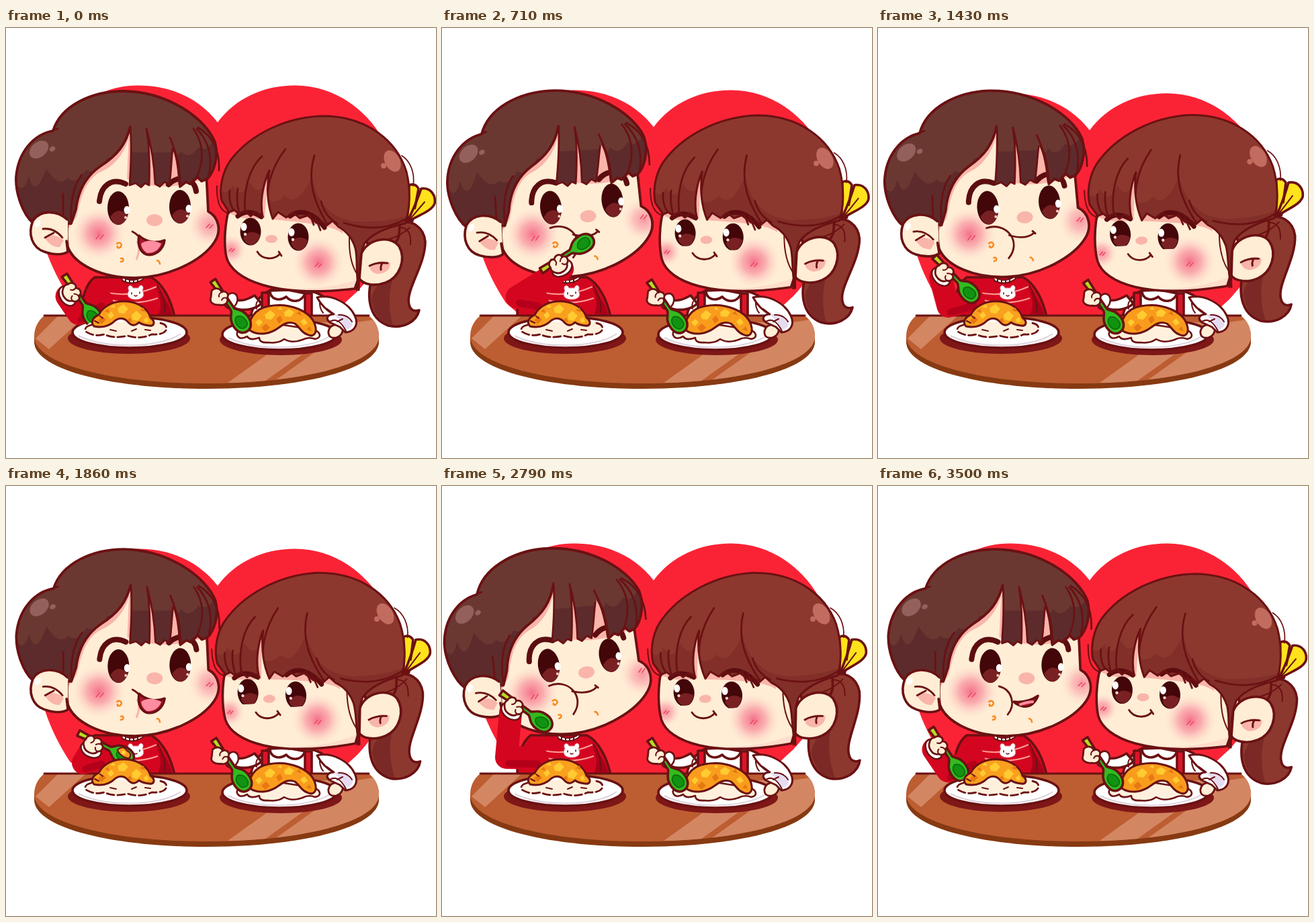
An HTML page that plays this animation: 640 by 640 pixels, repeating every 3.57 s.

```html
<!DOCTYPE html>
<html lang="en">
<head>
<meta charset="utf-8">
<title>Lunch together</title>
<style>
html, body { margin: 0; width: 100%; height: 100%; overflow: hidden; background: #fff; }
svg { display: block; width: 100%; height: 100%; }
.o { stroke: #6b1113; stroke-width: 3.6; stroke-linejoin: round; stroke-linecap: round; }
.l { fill: none; stroke: #6b1113; stroke-width: 2.8; stroke-linecap: round; stroke-linejoin: round; }
.t { stroke-width: 2; }
.b { stroke-width: 8; stroke: #5c0d10; }
.skin { fill: #ffedd6; }
.pink { fill: #f9b5aa; }
.white { fill: #fff; }
.crumb { fill: none; stroke: #f98b1d; stroke-width: 2.6; stroke-linecap: round; }
.tick { fill: none; stroke: #ee4863; stroke-width: 1.6; stroke-linecap: round; }
</style>
</head>
<body>
<svg viewBox="0 0 640 640">
<defs>
  <radialGradient id="blush">
    <stop offset="0" stop-color="#f4718a"/>
    <stop offset=".45" stop-color="#f8939e" stop-opacity=".7"/>
    <stop offset="1" stop-color="#ffd6c8" stop-opacity="0"/>
  </radialGradient>
  <linearGradient id="strand" gradientUnits="userSpaceOnUse" x1="0" y1="180" x2="0" y2="190">
    <stop offset=".4" stop-color="#6b3831"/>
    <stop offset=".6" stop-color="#5d2b2b"/>
  </linearGradient>
  <path id="boyFace" d="M99 225C94 265 88 300 92 326C102 352 142 372 192 372C243 371 292 346 310 319C322 301 316 281 301 273L296 175L185 130Z"/>
  <path id="boyHair" d="M40 290C25 277 14 246 15 222C18 184 42 158 70 153C82 115 128 94 175 94C240 95 296 133 311 170C317 192 309 216 299 225L291 228L285 222L274 232L268 229L259 236C258 212 256 192 247 174C238 158 205 149 185 147C178 174 166 189 140 206C117 222 107 245 104 270L97 291Z"/>
  <path id="girlFace" d="M334 262C325 290 324 322 328 341C337 375 400 402 519 388L540 330L520 240L360 200Z"/>
  <path id="girlHair" d="M321 257C317 239 322 214 334 197C364 157 420 131 476 131C538 133 582 168 596 214C603 242 601 272 594 291C570 296 546 305 534 320C527 334 526 352 525 390C520 362 524 345 520 328C515 311 506 302 495 296L486 287L477 294L468 287L462 290L449 279L437 283L428 275L417 282L405 274L397 284C389 262 387 240 392 212C381 235 378 262 382 281L372 274L364 280L356 272L347 277L340 271L332 274Z"/>
  <path id="tableTop" d="M57 428H540C550 436 555 447 555 459C555 500 440 529 298 529C155 529 42 500 42 459C42 447 47 436 57 428Z"/>
  <clipPath id="cBoyFace"><use href="#boyFace"/></clipPath>
  <clipPath id="cBoyHair"><use href="#boyHair"/></clipPath>
  <clipPath id="cGirlFace"><use href="#girlFace"/></clipPath>
  <clipPath id="cGirlHair"><use href="#girlHair"/></clipPath>
  <clipPath id="cTable"><use href="#tableTop"/></clipPath>
  <clipPath id="cEye"><rect id="lid" x="346" y="276" width="36" height="48"/></clipPath>
  <g id="spoon">
    <path class="o" fill="#b9dc22" d="M-28 -4L-2 -3V3L-28 5Z"/>
    <path class="o" fill="#33bb1f" d="M-2 -3L24 -3C29 -5 32 -13 46 -13C57 -13 63 -7 63 0C63 8 57 13 46 13C32 13 29 4 24 3L-2 3Z"/>
    <path fill="#119311" stroke="#0a6a0c" stroke-width="1.6" d="M36 1C38 -7 47 -8 52 -7C59 -4 58 5 51 7C44 9 38 7 36 1Z"/>
  </g>
</defs>

<path id="heart" fill="#fa2335" d="M315 140.5C288 105 246 85.5 197 85.5C115 85 47 158 45 240C45 301 62 351 95 402L150 450H460L523 392C562 351 582 301 582 240C580 158 512 85 430 85.5C383 85.5 341 105 315 140.5Z"/>

<!-- girl: tail and body -->
<g class="girlHead">
  <path fill="#8d382e" d="M520 285L602 285L604 325L582 338L556 320L530 340Z"/>
  <g id="tail">
    <path class="o" fill="#8d382e" d="M586 292C602 283 622 296 624 318C624 354 594 390 600 412C602 421 609 422 615 420C611 438 590 448 569 443C538 432 535 396 548 361C557 338 580 327 585 309Z"/>
    <path fill="#7b2926" d="M590 342C577 364 550 376 544 402C547 430 561 441 576 442C569 420 566 376 590 342Z"/>
    <path class="l t" d="M588 297Q604 299 602 322"/>
  </g>
</g>
<g>
  <path class="o white" d="M364 430C368 411 376 398 396 389L455 392C474 397 487 409 490 430Z"/>
  <path class="o white" d="M334 403C349 408 358 405 370 398L380 410C370 420 351 422 339 416Z"/>
  <path class="o" fill="#dd1429" d="M381 394H391V430H381ZM445 395H455V430H445Z"/>
  <path class="o white" d="M393 391C393 403 406 408 417 400C425 409 440 409 445 395L420 390Z"/>
  <path class="l t" d="M374 407Q371 412 373 418M467 405Q466 417 472 424"/>
</g>

<!-- boy: body and head -->
<g>
  <path class="o" fill="#d4061f" d="M112 430C112 407 117 382 132 371H216C235 381 246 407 251 430Z"/>
  <path fill="#a90019" d="M222 386C235 397 245 414 248 430H225C233 415 231 399 222 386Z"/>
  <path d="M151 394Q188 401 224 385M150 403Q190 415 226 402" fill="none" stroke="#ff9c96" stroke-width="2"/>
  <path class="o white" style="stroke-width:2" d="M172 370Q188 381 205 369L204 374Q188 384 173 376Z"/>
  <path class="l t" d="M178 373V378M184 375V380M190 375V380M196 374V379M225 384Q238 402 236 423"/>
  <path class="white" stroke="#e8889a" d="M183 391C179 383 187 381 189 387H197C199 380 207 383 203 391C208 400 201 404 193 404C184 404 178 399 183 391Z"/>
  <path d="M187 394V396M199 393V395M191 398Q193 400 195 398" class="l" style="stroke-width:1.6"/>
</g>
<g id="boyHead">
  <use href="#boyFace" class="skin"/>
  <g clip-path="url(#cBoyFace)">
    <path class="pink" d="M185 147C184 178 164 205 141 214C119 225 112 250 105 281L92 300V215L170 140ZM180 225Q240 248 301 222V130H184Z"/>
    <circle cx="138" cy="306" r="39" fill="url(#blush)"/>
    <circle cx="304" cy="293" r="33" fill="url(#blush)" opacity=".7"/>
  </g>
  <use href="#boyFace" class="l" style="stroke-width:3.8"/>
  <g id="boyFeat">
    <path class="l b" d="M139 258C141 235 157 222 178 232M242 233C258 217 281 224 283 243"/>
    <g id="eyeB">
      <ellipse cx="167" cy="268" rx="16" ry="25" fill="#430609"/>
      <path fill="#782022" d="M155 281Q167 264 181 279Q176 293 167 293Q159 292 155 281Z"/>
      <ellipse cx="180" cy="271" rx="4.5" ry="6" class="white"/>
      <circle cx="178" cy="282" r="2" fill="#ffd6d0"/>
    </g>
    <use href="#eyeB" x="92" y="-2"/>
    <ellipse cx="221" cy="286" rx="12" ry="9" class="pink"/>
    <path class="tick" d="M134 314L139 308M140 314L145 308M298 297L303 292M303 298L308 293"/>
    <path class="crumb" d="M165 321C170 317 175 324 169 327C166 328 165 326 166 325M171 343Q176 342 174 347L171 348M225 346Q228 346 229 351"/>
    <g class="mouth">
      <path class="l" d="M188 303Q196 307 199 313"/>
      <path d="M195 317Q201 329 194 345" fill="none" stroke="#f9b5aa" stroke-width="3"/>
      <path class="o" fill="#ad1730" d="M198 309C209 319 224 321 236 316C234 330 222 340 209 337C198 333 196 320 198 309Z"/>
      <path fill="#ff8da1" d="M201 321Q214 312 231 321Q226 335 210 335Q202 330 201 321Z"/>
    </g>
    <g class="mouth">
      <path class="l" d="M188 303Q198 309 195 324"/>
      <path class="o" fill="#b51934" d="M201 315Q221 323 237 317L226 342L202 337Z"/>
      <path fill="#ff8da1" d="M204 319Q218 324 232 320L226 335L202 332Z"/>
    </g>
    <g class="mouth">
      <path class="l" d="M163 298C193 290 215 322 193 345M196 311Q220 320 233 310M231 307L235 311"/>
    </g>
    <g class="mouth">
      <path class="l" d="M180 298C200 303 205 326 193 340"/>
      <path class="o" fill="#c7203b" d="M202 321Q222 323 238 312Q231 329 217 328Q207 326 202 321Z"/>
      <path d="M212 325Q222 321 230 321" fill="none" stroke="#ff8da1" stroke-width="4" stroke-linecap="round"/>
    </g>
  </g>
  <use href="#boyHair" fill="#6b3831"/>
  <g clip-path="url(#cBoyHair)">
    <path fill="#5d2b2b" d="M12 225Q25 253 34 220Q43 257 60 209Q78 239 92 223Q106 235 119 211Q136 221 150 194Q165 194 185 147L240 185Q252 198 260 183Q273 198 286 177Q300 188 313 160V250H180L95 300H12Z"/>
    <path class="l" d="M279 150Q303 184 281 228M284 150Q312 180 301 223M113 218Q95 241 97 288M85 247V280"/>
  </g>
  <use href="#boyHair" class="l" style="stroke-width:3.8"/>
  <g id="fringe">
    <path fill="url(#strand)" d="M185 147C187 170 186 205 184 234L193 231L201 237L207 231L213 234C214 205 214 178 209 152C217 178 221 205 222 232L229 236L236 229L243 233C246 215 246 195 248 180L255 172L225 144L188 138Z"/>
    <path class="l" d="M185 147C187 170 186 205 184 234L193 231L201 237L207 231L213 234C214 205 214 178 209 150C217 178 221 205 222 232L229 236L236 229L243 233C246 215 246 195 248 180"/>
  </g>
  <path class="l" d="M244 163Q256 190 258 233M286 148Q319 168 317 212M68 153Q73 151 77 150"/>
  <ellipse cx="49" cy="181" rx="16" ry="11" transform="rotate(-40 49 181)" fill="#94605b"/>
  <ellipse cx="69" cy="180" rx="4.5" ry="3.5" transform="rotate(-30 69 180)" fill="#94605b"/>
  <path class="skin" d="M92 287C75 270 50 271 40 287C32 307 39 327 57 333C71 338 85 338 92 333Z"/>
  <path class="pink" d="M57 311Q73 304 86 316L80 326Q66 327 57 311Z"/>
  <path class="l" style="stroke-width:3.6" d="M91 285C75 270 50 271 40 287C32 307 39 327 57 333C71 338 85 338 92 333L90 317"/>
  <path class="l" d="M55 299Q72 297 84 312M58 312Q65 308 71 305"/>
  <ellipse cx="47" cy="291" rx="4" ry="6" class="white" transform="rotate(30 47 291)"/>
</g>

<!-- girl: head -->
<g class="girlHead">
  <g transform="translate(2 2)">
    <path class="o" fill="#ffe21c" d="M598 232Q607 228 612 237L603 285L595 287Z"/>
    <path class="o" fill="#ffe21c" d="M595 287Q609 258 616 237C631 235 638 248 636 259C632 271 612 276 595 287Z"/>
    <path class="l t" d="M598 284L621 257M607 267L613 242"/>
  </g>
  <path class="l" style="stroke-width:1.7" d="M589 190C602 198 609 216 606 235"/>
  <use href="#girlFace" class="skin"/>
  <g clip-path="url(#cGirlFace)">
    <path class="pink" d="M325 270Q345 288 385 283L389 230L397 285Q435 288 465 293Q492 298 501 306V230L390 195L325 250Z"/>
    <circle cx="465" cy="349" r="38" fill="url(#blush)"/>
    <circle cx="335" cy="330" r="22" fill="url(#blush)" opacity=".8"/>
    <path fill="#ffd6c6" d="M365 380Q450 398 522 375V400H390Z" opacity=".7"/>
  </g>
  <use href="#girlFace" class="l" style="stroke-width:3.6"/>
  <g id="eyeG" clip-path="url(#cEye)">
    <ellipse cx="364" cy="303" rx="15.5" ry="20.5" fill="#430609"/>
    <path fill="#782022" d="M353 312Q362 298 378 308Q374 323 364 323Q356 321 353 312Z"/>
    <ellipse cx="354" cy="296" rx="4.5" ry="6" class="white"/>
    <circle cx="356" cy="307" r="2.2" fill="#ffd6d0"/>
  </g>
  <use href="#eyeG" x="71" y="8"/>
  <ellipse cx="395" cy="314" rx="9" ry="6" class="pink"/>
  <path class="l" d="M374 333C381 345 399 346 408 336M406 333L410 339"/>
  <path class="tick" d="M460 355L465 350M465 356L470 351M332 332L336 328M336 333L340 329"/>
  <use href="#girlHair" fill="#8d382e"/>
  <g clip-path="url(#cGirlHair)">
    <path fill="#822f29" d="M316 232Q324 256 338 234Q349 259 363 229Q374 252 388 232L380 285H316ZM390 256Q405 262 415 249Q430 266 447 237L456 222Q466 281 520 288Q566 290 600 279V300L535 318L525 390L498 330V297L390 290Z"/>
    <path class="l" d="M381 191C361 209 353 244 356 273M416 180C397 205 381 243 395 279M459 190C448 227 458 258 478 292M345 239Q342 256 347 275M333 242Q331 260 339 271M503 290Q555 307 596 284M469 258Q474 280 493 291"/>
  </g>
  <path class="l b" style="stroke-width:7" d="M345 280Q360 268 380 281M423 280C440 267 461 278 474 297"/>
  <path class="l" d="M460 280L468 301M452 276L458 293"/>
  <use href="#girlHair" class="l" style="stroke-width:3"/>
  <path class="l t" d="M314 235C313 260 319 273 332 276M511 312Q510 347 523 367M552 317Q580 316 601 297"/>
  <ellipse cx="575" cy="198" rx="11" ry="17" transform="rotate(-28 575 198)" fill="#c26c60"/>
  <circle cx="562" cy="205" r="4" fill="#c26c60"/>
  <path class="o skin" d="M529 336C537 314 572 307 585 325C596 344 586 371 565 379C546 386 530 380 526 373Z"/>
  <path class="pink" d="M541 356Q557 342 572 350Q571 365 553 366Q543 364 541 356Z"/>
  <path class="l" d="M541 354Q552 348 568 350M560 350Q557 355 558 360M522 390L525 366"/>
</g>

<!-- table and plates -->
<use href="#tableTop" fill="#873a12" y="8"/>
<path fill="#873a12" d="M42 459H555V468H42Z"/>
<use href="#tableTop" fill="#bd5d32"/>
<g clip-path="url(#cTable)" fill="#d38662">
  <path d="M78 428H119L64 478L44 462ZM330 528L456 438H508L382 528ZM396 528L522 438L640 420L474 528Z"/>
</g>
<path class="l" d="M57 428H540"/>
<g fill="#7e1717"><ellipse cx="183" cy="462" rx="91" ry="23"/><ellipse cx="409" cy="464" rx="91" ry="23"/></g>
<g id="plate">
  <ellipse class="o white" cx="184" cy="453" rx="85" ry="23"/>
  <path d="M108 458Q140 474 195 472Q240 469 260 455" fill="none" stroke="#ded2dc" stroke-width="2"/>
</g>
<use href="#plate" x="223" y="3"/>

<!-- boy: arm -->
<path id="sleeve" fill="none" stroke="#d4061f" stroke-width="34" stroke-linecap="round" stroke-linejoin="round"/>
<path id="fold" fill="none" stroke="#b5001b" stroke-width="11" stroke-linecap="round"/>
<g id="hand">
  <ellipse class="o white" style="stroke-width:2.6" cx="0" cy="14" rx="16" ry="11"/>
  <use href="#spoon"/>
  <g id="bite">
    <path class="o" style="stroke-width:2" fill="#f99d20" d="M35 -3Q39 -14 48 -9Q58 -9 56 0Q46 4 35 -3Z"/>
    <circle cx="45" cy="-4" r="3" fill="#ffd43a"/>
  </g>
  <path class="o skin" style="stroke-width:2.8" d="M-14 4C-15 -3 -7 -8 -3 -3C2 -9 10 -6 9 0C16 0 16 9 10 12C7 21 -7 21 -12 14C-15 11 -16 8 -14 4Z"/>
  <path class="l t" d="M-3 -3Q-1 2 -5 5M9 0Q5 1 3 4M10 12Q5 12 4 8"/>
</g>

<!-- left meal -->
<path fill="#fff0dd" d="M119 449Q118 439 130 438L228 437Q242 441 238 449Q234 458 217 456Q200 464 181 458Q158 463 146 456Q124 460 119 449Z"/>
<path class="l" stroke-dasharray="11 5" d="M127 442Q115 445 119 452Q132 460 146 456Q161 463 181 458Q200 464 217 456Q236 457 239 448Q239 440 228 439"/>
<path class="l t" d="M155 449L164 451M187 451L194 448M207 449L215 450"/>
<path class="o" style="stroke-width:3" fill="#f9a01f" d="M131 444C125 438 130 430 138 427C145 413 162 405 181 407C200 409 212 420 215 431C223 437 221 444 213 443Q203 442 198 438Q190 446 183 439Q174 428 163 435Q150 448 131 444Z"/>
<path fill="#ffcb30" d="M166 417L175 411L182 418L176 425L168 424ZM187 427L194 421L202 428L196 436L188 434ZM151 427L157 422L161 428L155 433ZM205 434L210 430L213 437L207 439ZM155 416L160 411L163 416Z"/>
<path fill="#e77812" d="M137 435L144 429L149 434L142 441ZM180 435L185 431L188 438ZM199 420L205 416L207 423ZM147 422L152 418L154 424Z"/>
<path class="l t" d="M132 436L138 439M140 429L144 432"/>

<!-- right meal -->
<path class="o" style="stroke-width:2.6" fill="#fff0dd" d="M346 460C339 453 349 446 357 448L400 440L458 449C469 453 470 461 460 463Q451 459 441 464Q426 470 414 463Q405 470 390 468Q377 469 377 461Q363 466 359 459Q350 464 346 460Z"/>
<path class="o" style="stroke-width:3" fill="#f99c1d" d="M363 450C360 435 369 418 391 414C423 408 454 422 460 442C464 455 457 461 448 456C439 453 438 446 430 440C421 436 414 440 406 446C394 455 376 459 363 450Z"/>
<path fill="#ffcb30" d="M385 427L393 420L401 426L395 434L387 433ZM414 423L421 418L429 423L424 430L415 429ZM371 438L377 433L382 438L376 444ZM438 437L444 432L449 439L443 443ZM404 418L409 415L411 420Z"/>
<path fill="#e77812" d="M402 433L408 428L412 435L406 440ZM380 446L387 440L393 446L386 452ZM432 425L437 421L440 428ZM447 449L452 444L455 451Z"/>

<!-- girl: arms -->
<g id="girlHand">
  <ellipse class="o white" style="stroke-width:2.6" cx="335" cy="406" rx="9" ry="12" transform="rotate(25 335 406)"/>
  <use href="#spoon" transform="translate(324 399) rotate(56)"/>
  <path class="o skin" style="stroke-width:2.8" d="M306 391C312 385 319 388 321 393C327 390 333 396 329 402C332 409 325 414 318 412C309 413 302 408 305 401Z"/>
  <path class="l t" d="M321 393Q316 396 317 400M329 402Q323 400 321 405"/>
</g>
<path class="o skin" style="stroke-width:2.8" d="M484 444C493 439 503 443 501 451C499 460 488 464 482 459C478 454 480 448 484 444Z"/>
<path class="o white" style="stroke-width:3" d="M463 401C485 396 510 409 519 428C525 440 520 452 505 453L497 445L482 438C474 432 480 426 488 426C478 421 470 414 463 401Z"/>
<path fill="#e5dcf2" d="M488 427Q502 424 515 434Q519 446 506 449Q499 435 488 427Z"/>
<path class="l t" d="M482 437Q495 429 506 451M495 427Q508 426 515 437M487 425L478 418M493 437L501 433"/>
</svg>
<script>
const LOOP = 3570, STEPS = 50;
const $ = s => document.querySelector(s), all = s => [...document.querySelectorAll(s)];

// Rows are [step, ...values]
const heartY = [[0, 0], [6, 4], [14, 12], [18, 13], [26, 8], [33, 1], [39, 0], [50, 0]];
const girlTilt = [[0, 0], [6, -1.2], [14, -2.5], [26, -3.4], [33, -4.3], [39, -3.4], [49, -.5], [50, 0]];
const tailTilt = [[0, 0], [6, 3], [14, 1.5], [26, .5], [33, -1.2], [39, -2], [49, 0], [50, 0]];
const lidRise = [[0, 0], [6, 1], [14, 3], [26, 4], [33, 4], [39, 2], [49, 0], [50, 0]];
// head tilt, face turn
const boyTilt = [[0, 0, 0], [1, .2, 0], [6, 4, 0], [8, -2.6, -2], [14, -6, -4], [24, .2, 0], [25, 0, 0]];
const boyTilt2 = boyTilt.map(r => r[0] === 14 ? [14, -5.2, -3] : r);
// spoon grip x, y, angle, elbow x, y
const arm = [[0, 103, 391, 56, 108, 425], [1, 133, 380, 27, 115, 412], [6, 168, 361, -23, 120, 405],
  [8, 182, 350, -45, 113, 401], [14, 117, 325, 30, 105, 399], [24, 95, 384, 57, 104, 424], [25, 103, 391, 56, 108, 425]];
const arm2 = arm.map(r => r[0] === 14 ? [14, 111, 324, 36, 96, 404] : r);

function at(rows, s) {
  const i = Math.max(1, rows.findIndex(r => r[0] >= s));
  const a = rows[i - 1], b = rows[i], k = (s - a[0]) / (b[0] - a[0]);
  return a.slice(1).map((v, j) => v + (b[j + 1] - v) * k);
}
const set = (el, t) => el.setAttribute('transform', t);
const mouths = all('.mouth'), girlHeads = all('.girlHead');
const mouthAt = p => p < 5 ? 0 : p < 8 ? 1 : p < 22 ? 2 : 3;

function draw(s) {
  const p = s % 25, second = s >= 25;
  set($('#heart'), `translate(0 ${at(heartY, s)[0]})`);

  const [tilt] = at(girlTilt, s);
  girlHeads.forEach(g => set(g, `rotate(${tilt} 440 370)`));
  set($('#tail'), `rotate(${at(tailTilt, s)[0]} 590 295)`);
  set($('#lid'), `translate(0 ${-at(lidRise, s)[0]})`);
  set($('#girlHand'), `translate(${-tilt * .4} ${-tilt * .4})`);

  const [head, face] = at(second ? boyTilt2 : boyTilt, p);
  set($('#boyHead'), `rotate(${head} 155 355)`);
  set($('#boyFeat'), `rotate(${face} 165 270)`);
  set($('#fringe'), `translate(0 147) skewX(${-face * -2}) translate(0 -147)`);
  const m = mouthAt(p);
  mouths.forEach((g, i) => g.style.display = i === m ? '' : 'none');

  const [x, y, a, ex, ey] = at(second ? arm2 : arm, p);
  const r = a * Math.PI / 180, wx = x - Math.sin(r) * 15, wy = y + Math.cos(r) * 15;
  set($('#hand'), `translate(${x} ${y}) rotate(${a})`);
  $('#sleeve').setAttribute('d', `M142 405L${ex} ${ey}L${wx} ${wy}`);
  $('#fold').setAttribute('d', `M142 414L${ex + 4} ${ey + 9}`);
  $('#bite').style.display = p >= 1 && p < 8 ? '' : 'none';
}

const start = performance.now();
let last = -1;
function tick(now) {
  const t = Math.max(0, now - start) % LOOP;
  const s = Math.min(STEPS - 1, Math.floor((t + 2) / LOOP * STEPS));
  if (s !== last) draw(last = s);
  requestAnimationFrame(tick);
}
draw(0);
requestAnimationFrame(tick);
</script>
</body>
</html>
```
